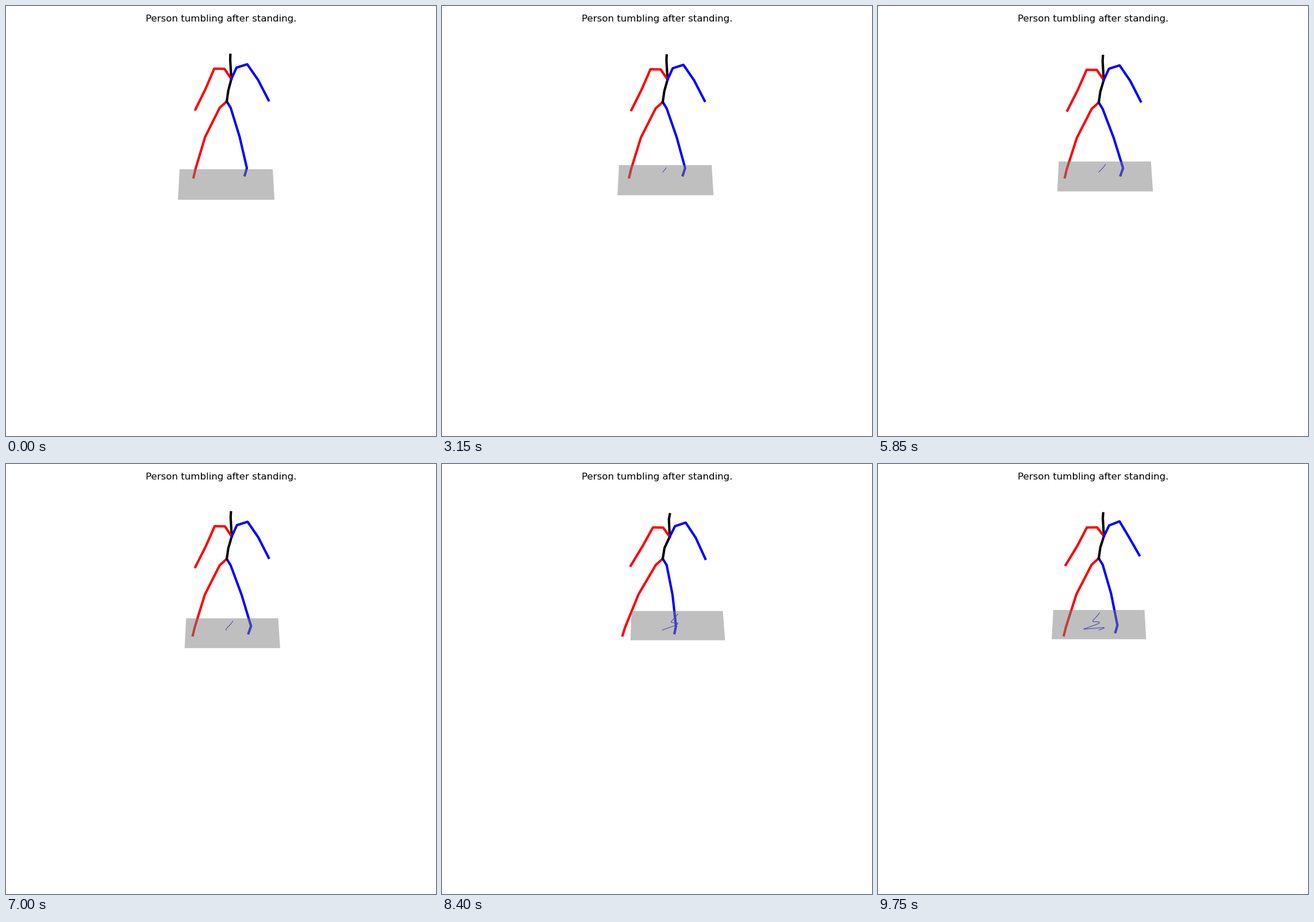
Write a matplotlib script that moves like this. It is 748 px wide and 748 px high and loops after 9.8 s.

```python
import numpy as np
import matplotlib.pyplot as plt
from matplotlib.animation import FuncAnimation
from matplotlib.patches import Polygon

SIZE, FRAMES, STEP = 748, 196, 50
HORIZON, EDGE, CENTER = -1137, 1421, 383   # floor perspective
HALF_WIDTH, NEAR = 81, 0.964               # floor extent
FOOT_X, FOOT_U = 1, 0.9965                 # floor point below the hips

t = np.arange(FRAMES) * STEP / 1000


def slide(start, end):
    return np.clip((t - start) / (end - start), 0, 1)


def ease(start, end):
    s = slide(start, end)
    return s * s * (3 - 2 * s)


def bump(center, width):
    return np.exp(-((t - center) / width) ** 2)


def limb(points, dx=(), dy=()):
    """Shift each joint by motions, each given with one weight per joint."""
    path = np.tile(np.array(points, float), (FRAMES, 1, 1))
    for axis, moves in enumerate((dx, dy)):
        for motion, weights in moves:
            path[:, :, axis] += np.outer(motion, weights)
    return path


# A slow sink, then a stumble with a sidestep and a partial recovery.
sink = 2 * slide(0, 6) - 3 * bump(6.9, 0.4) - 4 * ease(7.2, 8.9)
lean = 0.7 * slide(0, 6) + 3.6 * ease(7, 7.7) - 3.3 * ease(8.4, 9.75)
nod = 4 * ease(7, 7.8) - 1.2 * ease(8, 9)
swing = ease(9, 9.75)
tilt = bump(7.8, 0.35)
recover = ease(8.95, 9.75)
right_step = -1.2 * slide(0, 6) - 12.5 * ease(7.2, 8.9) + 11 * recover
left_step = 7.5 * slide(0, 6) - 19.5 * ease(6.9, 8.4) + 9.5 * recover

spine = limb(
    [(384, 166), (386.7, 147), (392, 127), (390, 93.5), (390.3, 85)],
    dx=[(lean, [0, 0.1, 0.95, 1.1, 1.4])],
    dy=[(sink, [1] * 5), (nod, [0, 0, 0.25, 1, 1])])
hips, chest = spine[:, :1], spine[:, 2:3]

right_arm = limb(
    [(380, 109.3), (362.2, 109), (347.2, 144), (329.5, 180)],
    dx=[(lean, [1.1, 1.1, 0.5, -0.3]), (swing, [0, 0, -1, -2.7])],
    dy=[(sink, [1] * 4), (nod, [0.7, 0.7, -0.2, -0.5]),
        (swing, [1, 1.5, 1, -1])])
left_arm = limb(
    [(401, 107.2), (419.6, 101.3), (438.3, 128.3), (456.8, 164)],
    dx=[(lean, [1, 1, 0.7, 0.3]), (swing, [0, -0.5, -2.5, -2.5])],
    dy=[(sink, [1] * 4), (nod, [0.6, 0.5, 0.3, 0.6]),
        (swing, [0, -1, 0, -5])])
right_leg = limb(
    [(371.7, 177), (346.3, 228), (329.5, 284), (326.3, 298)],
    dx=[(right_step, [0, 0.42, 1, 1.1])],
    dy=[(sink, [1, 0.8, 0, 0]), (tilt, [0, 1.5, 5, 4.5])])
left_leg = limb(
    [(390.8, 177), (406.5, 228), (419, 282), (415.3, 294.5)],
    dx=[(left_step, [0, 0.46, 1, 0.9])],
    dy=[(sink, [1, 0.5, 0, 0]), (tilt, [0, 0, -3.5, -3.5]),
        (swing, [0, -2, -1.5, -2])])


def joined(start, path):
    return np.concatenate([start, path], axis=1)


limbs = [
    (joined(hips, right_leg), "red"), (joined(hips, left_leg), "blue"),
    (spine, "black"),
    (joined(chest, right_arm), "red"), (joined(chest, left_arm), "blue"),
]

# The floor drifts under the body, which stays in view.
drift_x = (11.7 * slide(0, 5.85) ** 1.2 - 11.5 * ease(6.9, 7.4)
           + 27 * ease(7.5, 8.35) - 35.5 * ease(8.35, 9.05)
           + 9.6 * ease(9.1, 9.75))
drift_y = (-13.5 * slide(0, 5.85) - 2.8 * slide(5.85, 7.4)
           - 12 * ease(7.3, 8.4) + 2.5 * ease(8.4, 8.95)
           - 4.2 * ease(9, 9.75))
drift_u = EDGE / (EDGE + drift_y) - 1


def project(x, u):
    return np.column_stack([CENTER + x / u, HORIZON + EDGE / u])


fig = plt.figure(figsize=(10, 10), dpi=SIZE / 10, facecolor="white")
fig.suptitle("Person tumbling after standing.", fontsize=16)
ax = fig.add_axes([0, 0, 1, 1])
ax.set_xlim(0, SIZE)
ax.set_ylim(SIZE, 0)
ax.axis("off")

trail, = ax.plot([], [], color="blue", lw=1)
lines = [ax.plot([], [], color=color, lw=4)[0] for _, color in limbs]
floor = ax.add_patch(Polygon(np.zeros((4, 2)), facecolor=(0.5, 0.5, 0.5, 0.5),
                             edgecolor="none", lw=0, zorder=5))


def draw(i):
    x = drift_x[i] + HALF_WIDTH * np.array([-1, 1, 1, -1])
    u = drift_u[i] + np.array([1, 1, NEAR, NEAR])
    floor.set_xy(project(x, u))
    past = project(FOOT_X + drift_x[i] - drift_x[:i],
                   FOOT_U + drift_u[i] - drift_u[:i])
    trail.set_data(past[:, 0], past[:, 1])
    for line, (path, _) in zip(lines, limbs):
        line.set_data(path[i, :, 0], path[i, :, 1])
    return [trail, *lines, floor]


anim = FuncAnimation(fig, draw, frames=FRAMES, interval=STEP,
                     repeat=True, repeat_delay=0)
plt.show()
```
